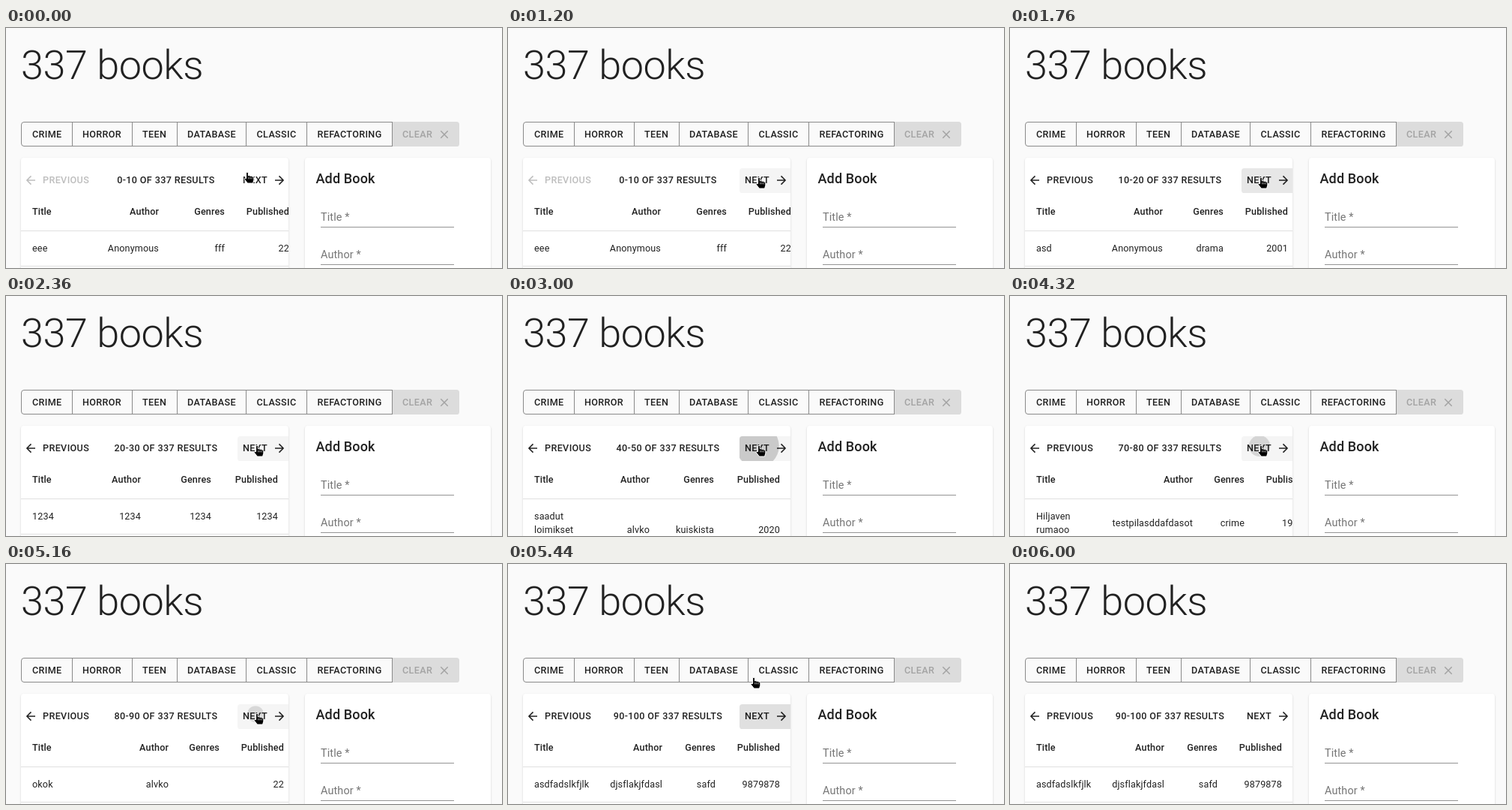
An HTML page for the animation above (6320 ms loop, 662 by 320 pixels).

```html
<!DOCTYPE html>
<html lang="en">
<head>
<meta charset="utf-8">
<title>Book list</title>
<style>
html, body { margin: 0; width: 100%; height: 100%; overflow: hidden; background: #fafafa; }
#stage { position: relative; width: 662px; height: 320px; overflow: hidden; }
.card {
  position: absolute; top: 173px; height: 200px; background: #fff; border-radius: 3.6px;
  box-shadow: 0 2px 1px -1px rgba(0,0,0,.2), 0 1px 1px rgba(0,0,0,.14), 0 1px 3px rgba(0,0,0,.12);
}
svg { position: absolute; left: 0; top: 0; }
text { font-family: Roboto, sans-serif; font-size: 12.6px; fill: rgba(0,0,0,.87); white-space: pre; }
.h2 { font-size: 54px; font-weight: 300; letter-spacing: -.45px; }
.h6 { font-size: 18px; font-weight: 500; letter-spacing: .135px; }
.btn { font-weight: 500; letter-spacing: .36px; }
.th { font-weight: 500; letter-spacing: .135px; }
.td { letter-spacing: .135px; }
.label { font-size: 14.4px; letter-spacing: .135px; fill: rgba(0,0,0,.54); }
.end { text-anchor: end; }
.mid { text-anchor: middle; }
.off { fill: rgba(0,0,0,.26); }
.icon { fill: none; stroke: rgba(0,0,0,.87); stroke-width: 1.5; }
.icon.off { stroke: rgba(0,0,0,.26); }
.rule { stroke: #e0e0e0; }
.field { stroke: rgba(0,0,0,.42); }
.frame { fill: none; stroke: #8a8a8a; }
</style>
</head>
<body>
<div id="stage">
  <div class="card" style="left:20px;width:357px"></div>
  <div class="card" style="left:399px;width:248px"></div>
  <svg width="662" height="320" viewBox="0 0 662 320">
    <defs>
      <clipPath id="cardClip"><rect x="20" y="173" width="357" height="160"/></clipPath>
      <clipPath id="nextClip"><rect x="309" y="187" width="76" height="33" rx="3.6"/></clipPath>
    </defs>
    <text class="h2" x="20" y="68">337 books</text>

    <g id="filters">
      <path d="M516 125H601.4a3.6 3.6 0 0 1 3.6 3.6V154.4a3.6 3.6 0 0 1-3.6 3.6H516Z" fill="rgba(0,0,0,.12)"/>
      <path class="frame" d="M516 125.5H24a3.5 3.5 0 0 0-3.5 3.5V154a3.5 3.5 0 0 0 3.5 3.5H516"/>
      <text class="btn off" x="529" y="146">CLEAR</text>
      <path class="icon off" d="M580.3 137.3l9.4 9.4m0-9.4l-9.4 9.4"/>
    </g>

    <g clip-path="url(#cardClip)">
      <rect id="hover" x="309" y="187" width="76" height="33" rx="3.6" fill="rgba(0,0,0,.04)"/>
      <path id="prevIcon" class="icon" d="M39 203H28m5.5-5.6L27.9 203l5.6 5.6"/>
      <text id="prev" class="btn" x="49" y="207">PREVIOUS</text>
      <text id="range" class="btn mid" x="213.5" y="207"></text>
      <text class="btn" x="316" y="207">NEXT</text>
      <path class="icon" d="M359 203h11m-5.5-5.6l5.6 5.6l-5.6 5.6"/>
      <path class="rule" d="M20 270.5H377"/>
      <g id="table"></g>
      <g id="ripples" clip-path="url(#nextClip)"></g>
    </g>

    <text class="h6" x="413.5" y="207">Add Book</text>
    <text class="label" x="420" y="257">Title *</text>
    <path class="field" d="M420 265.5H598"/>
    <text class="label" x="420" y="307">Author *</text>
    <path class="field" d="M420 315.5H598"/>

    <g id="hand">
      <path d="M3.6 2Q5 .2 6.4 2V6Q8 5 9 6.4Q10.4 5.6 11.4 7Q13.6 6.4 13.8 8.6V11.6L12.6 16H5.4L1.2 10.6Q1 8.6 3.6 9.6Z"
            fill="#000" stroke="#fff" stroke-width="1" stroke-linejoin="round"/>
      <path d="M6.8 8V10.4M9 8V10.4M11.2 8.4V10.4" stroke="#fff" stroke-width=".7"/>
    </g>
  </svg>
</div>
<script>
const LOOP = 6320, STEP = 40;
const $ = id => document.getElementById(id);
const SVG = "http://www.w3.org/2000/svg";

// title lines, author, genre, year, right edges of the last three columns
const pages = [
  [["eee"], "Anonymous", "fff", "22", 204, 292, 378],
  [["asd"], "Anonymous", "drama", "2001", 204, 285, 371],
  [["1234"], "1234", "1234", "1234", 180, 274, 363],
  [["testi"], "asdf", "crime", "2019", 184, 275, 363],
  [["saadut", "loimikset", ""], "alvko", "kuiskista", "2020", 189, 275, 363],
  [["uusi"], "alvko", "crime", "2020", 185, 275, 363],
  [["qwerty"], "asdasd", "fff", "1999", 196, 277, 363],
  [["Hiljaven", "rumaoo"], "testpilasddafdasot", "crime", "19840", 244, 313, 399],
  [["okok"], "alvko", "", "22", 217, 285, 371],
  [["asdfadslkfjlk"], "djsflakjfdasl", "safd", "9879878", 206, 277, 363]
];

// press, release, moment the next page shows
const clicks = [
  [1280, 1380, 1480], [1690, 1770, 1920], [2400, 2450, 2600],
  [2720, 3000, 2960], [3240, 3320, 3440], [3520, 3600, 3720],
  [3740, 3780, 4040], [4140, 4360, 4480], [5005, 5120, 5300]
];

// time, left, top
const path = [
  [0, 317, 191], [400, 330, 198], [5400, 330, 198],
  [5520, 302, 12], [5680, 323, 183], [5960, 87, 0]
];

const clamp = v => Math.min(1, Math.max(0, v));
const ease = v => { v = clamp(v); return v * v * (3 - 2 * v); };

function add(parent, tag, attrs, content) {
  const el = document.createElementNS(SVG, tag);
  for (const k in attrs) el.setAttribute(k, attrs[k]);
  if (content) el.textContent = content;
  parent.appendChild(el);
  return el;
}

const filters = [["CRIME", 35, 88], ["HORROR", 102, 168], ["TEEN", 182, 228],
  ["DATABASE", 242, 320], ["CLASSIC", 334.5, 401], ["REFACTORING", 415.5, 515]];
for (const [name, x, edge] of filters) {
  add($("filters"), "text", { class: "btn", x, y: 146 }, name);
  add($("filters"), "path", { class: "frame", d: `M${edge + .5} 125V158` });
}

const ripples = clicks.map(() => add($("ripples"), "circle", { cx: 333, cy: 200, r: 0 }));

let shown = -1;
function showPage(n) {
  if (n === shown) return;
  shown = n;
  const [title, author, genre, year, ...edges] = pages[n];
  const extra = title.length - 1, table = $("table");
  table.textContent = "";
  add(table, "text", { class: "th", x: 35, y: 249 }, "Title");
  title.forEach((line, i) => add(table, "text", { class: "td", x: 35, y: 298 + 18 * i }, line));
  ["Author", "Genres", "Published"].forEach((head, i) => {
    const x = edges[i];
    add(table, "text", { class: "th end", x, y: 249 }, head);
    add(table, "text", { class: "td end", x, y: 298 + 9 * extra }, [author, genre, year][i]);
  });
  add(table, "path", { class: "rule", d: `M20 ${317.5 + 18 * extra}H377` });
  $("range").textContent = `${n * 10}-${n * 10 + 10} OF 337 RESULTS`;
  $("prev").classList.toggle("off", n === 0);
  $("prevIcon").classList.toggle("off", n === 0);
}

function moveHand(t) {
  let i = 0;
  while (i < path.length - 2 && t >= path[i + 1][0]) i++;
  const [t0, x0, y0] = path[i], [t1, x1, y1] = path[i + 1];
  const k = ease((t - t0) / (t1 - t0));
  const x = Math.round(x0 + (x1 - x0) * k), y = Math.round(y0 + (y1 - y0) * k);
  $("hand").setAttribute("transform", `translate(${x} ${y})`);
  $("hand").style.display = t < 6000 ? "" : "none";
}

function draw(time) {
  let t = Math.floor(time % LOOP / STEP) * STEP;
  if (t > 3000 && t < 3160) t = 3000; // brief stall
  showPage(clicks.filter(c => t >= c[2]).length);
  clicks.forEach(([press, release], i) => {
    const grow = ease((t - press) / 550);
    const fade = 1 - ease((t - release) / 550);
    ripples[i].setAttribute("r", 56 * grow);
    ripples[i].setAttribute("fill-opacity", t > press ? .87 * (.1 + .2 * grow) * fade : 0);
  });
  $("hover").style.opacity = t < 1200 ? 0 : 1 - ease((t - 5400) / 250);
  moveHand(t);
}

let start;
function tick(now) {
  if (start === undefined) start = now;
  draw(Math.max(0, now - start));
  requestAnimationFrame(tick);
}
draw(0);
requestAnimationFrame(tick);
</script>
</body>
</html>
```
